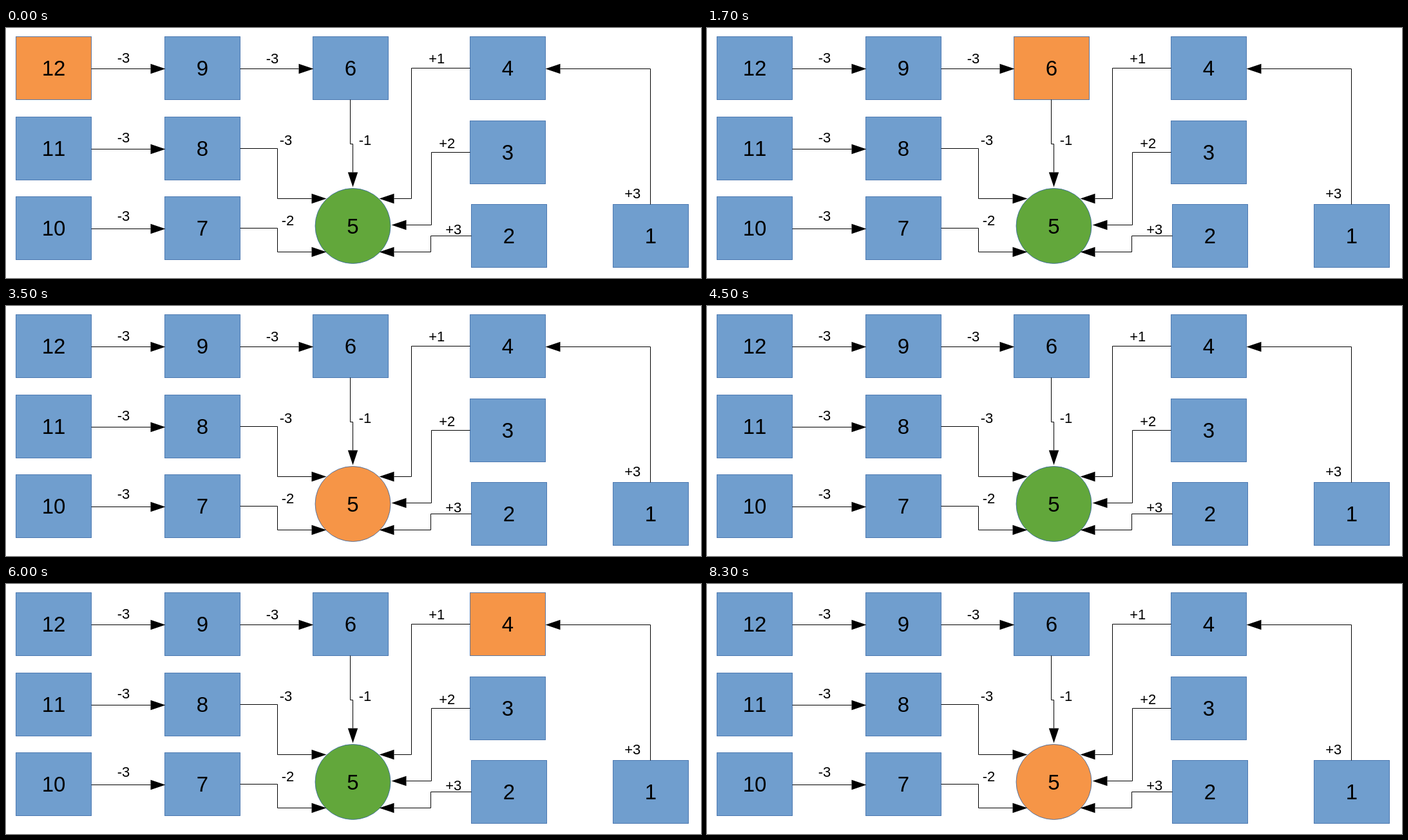
Recreate the animation shown at these times as an HTML page. Size 1079 by 389 pixels, loop 8.4 s.

```html
<!DOCTYPE html>
<html lang="en">
<head>
<meta charset="utf-8">
<title>Jump diagram</title>
<style>
  html, body { margin: 0; width: 100%; height: 100%; overflow: hidden; background: #fff; }
  svg { display: block; width: 1079px; height: 389px; }
  text { font-family: "Liberation Sans", Arial, sans-serif; font-kerning: none; text-anchor: middle; }
  .num { font-size: 33px; }
  .tag { font-size: 22px; }
  .node { stroke: #3465a4; stroke-opacity: .8; }
  .wire { fill: none; stroke: #000; }
</style>
</head>
<body>
<svg id="stage" viewBox="0 0 1079 389"></svg>
<script>
const BLUE = '#709ece', GREEN = '#62a73b', ORANGE = '#f69547';
const W = 117, H = 98, R = W / 2, GOAL = 5;
const stage = document.getElementById('stage');
const nodes = {};

// centre of the nearest pixel, so thin lines stay sharp
const snap = v => Math.ceil(v) - 0.5;

function add(tag, attrs, text = '') {
  const el = document.createElementNS('http://www.w3.org/2000/svg', tag);
  for (const key in attrs) el.setAttribute(key, attrs[key]);
  el.textContent = text;
  stage.appendChild(el);
  return el;
}

function addNode(n, x, y, shape, rest) {
  nodes[n] = { x, y, shape, rest };
  add('text', { class: 'num', x, y: Math.round(y + 11.5) }, n);
}

function addBox(n, left, top) {
  const x = snap(left), y = snap(top);
  const shape = add('rect', { class: 'node', x, y, width: W, height: H });
  addNode(n, x + W / 2, y + H / 2, shape, BLUE);
}

// wire along the points with an arrowhead at the last one
function addWire(points) {
  const p = points.map(([x, y]) => [snap(x), snap(y)]);
  const [px, py] = p[p.length - 2], [tx, ty] = p.pop();
  const dx = Math.sign(tx - px), dy = Math.sign(ty - py);
  const bx = tx - dx * 23, by = ty - dy * 23, half = 7.7;
  add('polyline', { class: 'wire', points: [...p, [bx, by]].join(' ') });
  add('polygon', {
    points: [[tx, ty], [bx - dy * half, by + dx * half], [bx + dy * half, by - dx * half]].join(' ')
  });
}

const addTag = (label, x, y) => add('text', { class: 'tag', x, y }, label);

// straight jump between two neighbours in a row
function jump(from, to) {
  const a = nodes[from], b = nodes[to], y = a.y + 1;
  addWire([[a.x + R, y], [b.x - R + 1, y]]);
}

// bent jump into the circle; side is -1 for its left half, 1 for its right
function bend(from, side, midX, tipX, tipY) {
  const a = nodes[from];
  addWire([[a.x - side * R, a.y], [midX, a.y], [midX, tipY], [tipX, tipY]]);
}

// 12 down to 6 fill columns of three
for (let n = 12; n > 5; n--) {
  const i = 12 - n;
  addBox(n, 15.5 + 230.75 * Math.floor(i / 3), 13.5 + 124.75 * (i % 3));
}
addBox(4, 720.5, 13.5);
addBox(3, 720.5, 144.5);
addBox(2, 722.5, 274.5);
addBox(1, 942.5, 274.5);

const cx = 538.5, cy = 308;
addNode(GOAL, cx, cy, add('circle', { class: 'node', cx, cy, r: R }), GREEN);
stage.insertBefore(nodes[GOAL].shape, stage.firstChild);

for (const n of [12, 11, 10, 9]) jump(n, n - 3);

const port = R * Math.SQRT1_2, portY = cy - 1;
bend(8, -1, 421.5, cx - port, portY - port);
bend(7, -1, 421.5, cx - port, portY + port);
bend(4, 1, 629.5, cx + port, portY - port);
bend(3, 1, 660.5, cx + R + 1.5, portY);
bend(2, 1, 659.5, cx + port, portY + port);

const six = nodes[6], one = nodes[1], four = nodes[4];
addWire([[six.x, six.y + H / 2], [six.x, 180.5], [cx, 180.5], [cx, cy - R - 1.5]]);
addWire([[one.x, one.y - H / 2], [one.x, four.y + 1], [four.x + R, four.y + 1]]);

addTag('-3', 182.5, 54);
addTag('-3', 413.5, 55);
addTag('-3', 182.5, 178);
addTag('-3', 182.5, 300);
addTag('-3', 434.5, 182);
addTag('-2', 437.5, 307);
addTag('-1', 557.5, 182);
addTag('+1', 668.7, 55);
addTag('+2', 684.7, 187);
addTag('+3', 694.7, 321);
addTag('+3', 972.7, 265);

// highlighted number (0 = none) and how long it stays
const steps = [[12, 1000], [9, 700], [6, 1000], [5, 1000], [0, 1000], [1, 1300], [4, 1000], [5, 1400]];
const loop = steps.reduce((sum, s) => sum + s[1], 0);

function render(ms) {
  let t = ms % loop, i = 0;
  while (t >= steps[i][1]) t -= steps[i++][1];
  for (const n in nodes) {
    const { shape, rest } = nodes[n];
    shape.setAttribute('fill', +n === steps[i][0] ? ORANGE : rest);
  }
}

const start = performance.now();
function tick() {
  render(performance.now() - start);
  requestAnimationFrame(tick);
}
tick();
</script>
</body>
</html>
```
